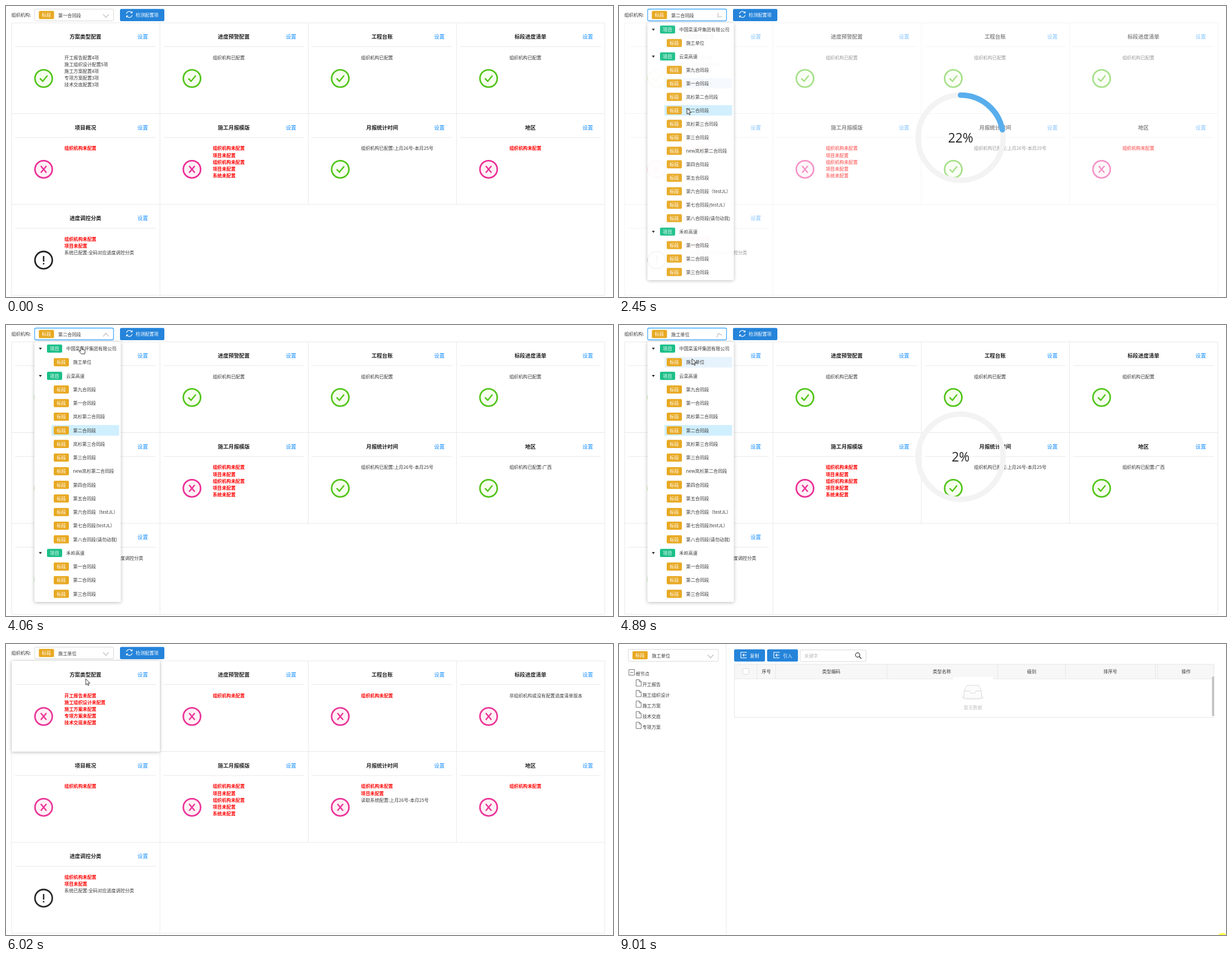
An HTML page for the animation above (9090 ms loop, 1081x518 px).

```html
<!DOCTYPE html>
<html lang="zh-CN">
<head>
<meta charset="utf-8">
<title>配置检测</title>
<style>
html, body { margin: 0; width: 100%; height: 100%; overflow: hidden; background: #fff; }
svg { display: block; width: 100%; height: 100%; }
text { font-family: "Noto Sans CJK SC", "Noto Sans CJK", "Noto Sans", sans-serif; white-space: pre; }
.shadow { filter: drop-shadow(0 1px 3px rgba(0, 0, 0, .28)); }
</style>
</head>
<body>
<svg id="stage" viewBox="0 0 1081 518"></svg>
<script>
const LOOP = 9090;
const FS = 8.14, BIG = 9.45;
const BLUE = '#2584da', LINK = '#1890ff', ORANGE = '#e8a922', GREEN = '#1bbf88', INK = '#383838';
const stage = document.getElementById('stage');

// Markup helpers; text is placed by its vertical middle
const text = (x, y, s, fill = INK, size = FS, extra = '') =>
  `<text x="${x}" y="${y + size * .37}" font-size="${size}" fill="${fill}" ${extra}>${s}</text>`;
const rect = (x, y, w, h, fill, extra = '') =>
  `<rect x="${x}" y="${y}" width="${w}" height="${h}" fill="${fill}" ${extra}/>`;
const path = (d, stroke, width = 1, extra = '') =>
  `<path d="${d}" fill="none" stroke="${stroke}" stroke-width="${width}" ${extra}/>`;
const group = (id, body, extra = '') => `<g id="${id}" ${extra}>${body}</g>`;
const tag = (x, y, s = '标段', fill = ORANGE) =>
  rect(x, y - 7.3, 27, 14.6, fill, 'rx="2"') + text(x + 5.3, y, s, '#fff');
const MID = 'text-anchor="middle"', BOLD = 'font-weight="700"';

// ---- cards ----
const X0 = 10, Y0 = 30, CW = 264.15, CH = 161.7;
const titles = ['方案类型配置', '进度预警配置', '工程台账', '标段进度清单', '项目概况',
  '施工月报模版', '月报统计时间', '地区', '进度调控分类'];
const NO = '!组织机构未配置', YES = '组织机构已配置', NOP = '!项目未配置';
const DATES = ':上月26号-本月25号', KIND = ':全码对应进度调控分类';
const plans = ['开工报告', '施工组织设计', '施工方案', '专项方案', '技术交底'];
const counts = s => plans.map((p, i) => `${p}配置${s[i]}项`);
const monthly = [NO, NOP, NO, NOP, '!系统未配置'];
const fallback = [NO, NOP, '系统已配置' + KIND];

// Icon codes per card: v = ok, x = failed, w = warning
const states = [
  { icons: 'vvvvxxvxw', lines: [counts('45433'), [YES], [YES], [YES], [NO], monthly, [YES + DATES], [NO], fallback] },
  { icons: 'vvvvvxvvv', lines: [counts('44434'), [YES], [YES], [YES], [YES], monthly, [YES + DATES],
    [YES + ':广西'], [YES + KIND, '（禾杉）']] },
  { icons: 'xxxxxxxxw', lines: [plans.map(p => `!${p}未配置`), [NO], [NO], ['非组织机构或没有配置进度清单版本'], [NO],
    monthly, [NO, NOP, '读取系统配置' + DATES], [NO], fallback] }
];
const marks = {
  v: ['#52c41a', '#f6ffed', 'M-6.5 0L-1.5 5L6.8 -5.2'],
  x: ['#eb2f96', '#fff0f6', 'M-5 -6L5 6M5 -6L-5 6'],
  w: ['#222', '#fff', 'M0 -7.5V2.6M0 5V7.7']
};
function icon(kind, x, y) {
  const [color, fill, d] = marks[kind];
  return `<g transform="translate(${x} ${y})"><circle r="15.4" fill="${fill}" stroke="${color}" stroke-width="2.8"/>` +
    path(d, color, 2.5) + '</g>';
}
function card(state, i) {
  const x = X0 + i % 4 * CW, y = Y0 + Math.floor(i / 4) * CH;
  return path(`M${x + 6} ${y + 42.3}h251`, '#e8e8e8') +
    text(x + 131.5, y + 24.5, titles[i], '#222', BIG, MID + ' ' + BOLD) +
    text(x + 224, y + 24.5, '设置', LINK, BIG, `id="link${i}"`) +
    icon(state.icons[i], x + 57, y + 99) +
    state.lines[i].map((s, k) => {
      const bad = s[0] === '!';
      return text(x + 94, y + 61.7 + k * 12.15, bad ? s.slice(1) : s, bad ? '#f00' : INK, FS, bad ? BOLD : '');
    }).join('');
}
function grid() {
  let d = `M10 30H1066.5V515H10ZM10 191.5H1066.5M10 353.2H1066.5M${X0 + CW} 30V515`;
  for (const k of [2, 3]) d += `M${X0 + k * CW} 30V353.2`;
  return path(d, '#e8e8e8');
}

// ---- selector and its tree ----
const rows = ['*中国栾溪坪集团有限公司', '施工单位', '*云栾高速', '第九合同段', '第一合同段', '岚杉第二合同段',
  '第二合同段', '岚杉第三合同段', '第三合同段', 'new岚杉第二合同段', '第四合同段', '第五合同段', '第六合同段（testJL）',
  '第七合同段(testJL）', '第八合同段(请勿动我)', '*禾岭高速', '第一合同段', '第二合同段', '第三合同段'];
const rowY = i => 42 + i * 24.25;
function row(s, i) {
  const y = rowY(i);
  if (s[0] === '*') return `<path d="M58.5 ${y - 1.5}h5.4l-2.7 3.6z" fill="#222"/>` +
    tag(73, y, '项目', GREEN) + text(107.3, y, s.slice(1));
  return rect(81, y - 9.4, 120.5, 18.8, '#fff', `id="row${i}" rx="1.5"`) + tag(85, y) + text(119.5, y, s);
}
const chevron = (id, x, y) => `<g transform="translate(${x} ${y})">` + path('M-5 -2.8L0 2.8L5 -2.8', '#b5b5b5', 1.1, `id="${id}"`) + '</g>';

const config =
  text(9.5, 16, '组织机构:') +
  rect(51, 5.5, 140.5, 21, '#fff', 'id="box" rx="2.5" stroke="#d9d9d9"') +
  tag(58.5, 16) + text(93, 16.5, '', INK, FS, 'id="value"') + chevron('chev', 178, 17.5) +
  rect(203, 5.3, 79, 21.8, BLUE, 'rx="2.5"') +
  path('M214.6 14a5.2 5.2 0 0 1 9.6 -1.8M224.6 16a5.2 5.2 0 0 1 -9.6 1.8M224.6 9.6v2.9h-2.9M214.6 20.4v-2.9h2.9', '#fff', 1.2) +
  text(231, 16.3, '检测配置项', '#fff', FS, 'font-weight="500"') +
  group('panel', grid() + rect(10, 30, CW, CH, '#fff', 'id="lift" class="shadow"') + group('cards', '')) +
  group('loader', '<circle cx="608.3" cy="234.5" r="75.8" fill="none" stroke="#f3f3f3" stroke-width="9.8"/>' +
    path('M608.3 158.7a75.8 75.8 0 1 1 -.01 0', '#58aeed', 9.8, 'id="arc" pathLength="100" stroke-linecap="round"') +
    `<text id="pct" x="608.3" y="243" font-size="22.8" fill="#262626" ${MID} style="font-family:'Open Sans',sans-serif"></text>`) +
  group('drop', rect(50.5, 30, 154, 463, '#fff', 'rx="2.5" class="shadow"') + rows.map(row).join(''));

// ---- plan page ----
function tool(x, label) {
  return rect(x, 9.5, 55, 21.7, BLUE, 'rx="2.5"') +
    path(`M${x + 21.5} 16V14.8H${x + 12}V24.8H${x + 21.5}V23.5M${x + 22} 19.8H${x + 15.5}M${x + 18} 17.3l-2.5 2.5l2.5 2.5`, '#fff', 1.1) +
    text(x + 28.3, 20.5, label, '#fff', FS, 'font-weight="500"');
}
const leaf = (s, i) => {
  const y = 72 + i * 18.9;
  return path(`M30.5 ${y - 8.5}h5.5l3.5 3.5v8h-9zM36 ${y - 8.5}v3.5h3.5`, '#666', .9) + text(41.7, y, s);
};
const heads = [['序号', 262.5], ['类型编码', 378], ['类型名称', 575], ['级别', 735], ['排序号', 875], ['操作', 1010]];
const table =
  rect(205, 36, 855, 26, '#f7f7f7') +
  path('M205.5 36V130.5H1059.5V36ZM205 62H1060' + [246, 279, 477, 674.5, 795, 955, 959].map(x => `M${x} 36V62`).join(''), '#e6e6e6') +
  rect(220.5, 43.5, 10.5, 10.5, '#fff', 'rx="1.5" stroke="#d9d9d9"') +
  heads.map(([s, x]) => text(x, 49, s, INK, FS, MID)).join('') +
  rect(595, 59, 71, 5, '#fff') + rect(1056, 58, 4, 70, '#c4c4c4') +
  '<ellipse cx="630" cy="95" rx="20.5" ry="4.5" fill="#f3f3f3"/>' +
  '<path d="M614.5 83.5L620 73.5H640.5L645.5 83.5V97H614.5ZM614.5 83.5H624L626 87.5H634L636 83.5H645.5" fill="#fcfcfc" stroke="#d9d9d9"/>' +
  text(630.3, 113, '暂无数据', '#bfbfbf', FS, MID);
const page = rect(0, 0, 1081, 518, '#fff') + path('M191 0V518', '#e8e8e8') +
  rect(16.5, 9.5, 160.5, 21.3, '#fff', 'rx="2.5" stroke="#d9d9d9"') + tag(24, 20) + text(58.5, 20.5, '施工单位') + chevron('c2', 163, 22) +
  path('M17.7 45.5h10v10h-10zM19.8 50.5h5.8', '#666', .9) + text(29.7, 53, '根节点') +
  ['开工报告', '施工组织设计', '施工方案', '技术交底', '专项方案'].map(leaf).join('') +
  tool(205, '复制') + tool(263.7, '引入') +
  rect(322.5, 10.5, 117.5, 20.7, '#fff', 'rx="2.5" stroke="#d9d9d9"') + text(330, 20.5, '关键字', '#b8b8b8') +
  '<circle cx="425" cy="19.5" r="3.8" fill="none" stroke="#333" stroke-width="1.2"/>' + path('M427.8 22.3L431.5 26', '#333', 1.4) +
  table;

const arrow = '<path id="arrow" d="M0 0V10.6L2.5 8.4L4.1 12L5.8 11.2L4.2 7.7H7.5Z" fill="#fff" stroke="#222" stroke-width=".9"/>';
const hand = '<path id="hand" d="M-1 1Q0 -.6 1.2 1V5.4L5.6 6.2Q7.2 6.6 7 8.4L6.2 13.2H.2L-3.8 8.6Q-4.2 7 -2.6 7.4L-1 8.6Z" fill="#fff" stroke="#222" stroke-width=".9" stroke-linejoin="round"/>';

stage.innerHTML = group('config', config) + group('page', page) +
  group('cursor', arrow + hand) + '<circle id="spot" cx="1074.5" cy="523" r="9" fill="#ffff55"/>';

// ---- timing ----
const el = {};
stage.querySelectorAll('[id]').forEach(n => { if (!/^link/.test(n.id)) el[n.id] = n; });
const set = (id, attrs) => { for (const k in attrs) el[id].setAttribute(k, attrs[k]); };
const show = (id, on) => set(id, { visibility: on ? 'inherit' : 'hidden' });
const clamp = v => Math.max(0, Math.min(1, v));
const ease = v => 1 - (1 - v) ** 2;
const smooth = v => v * v * (3 - 2 * v);
const ramp = (t, start, len) => clamp((t - start) / len);

const loads = [[2295, 3060], [4885, 5780]];
const opens = [[980, 2375], [3800, 4930]];
const hovers = [[3, 1200, 1400], [5, 1540, 1680], [6, 1680, 2290], [4, 2260, 2330], [1, 4300, 5100]];
// time, x, y, hand
const track = [[80, 804, 313, 0], [780, 128, 14, 1], [1010, 128, 14, 1], [1480, 114, 148, 1], [1850, 121, 182, 1],
  [2300, 121, 182, 0], [2560, 121, 182, 0], [3100, 136, 27, 1], [3810, 136, 27, 1], [4450, 130, 60, 1],
  [4800, 130, 60, 0], [5780, 130, 60, 0], [6020, 142, 62, 0], [6620, 240, 51, 1], [6840, 240, 51, 1], [7100, 246, 54, 1]];

function moveCursor(t) {
  let i = 0;
  while (i < track.length - 1 && track[i + 1][0] <= t) i++;
  const a = track[i], b = track[i + 1] || a;
  const p = smooth(clamp((t - a[0]) / (b[0] - a[0] || 1)));
  const x = a[1] + (b[1] - a[1]) * p, y = a[2] + (b[2] - a[2]) * p;
  set('cursor', { transform: `translate(${x} ${y})` });
  show('cursor', t >= 80 && t < 7450);
  show('hand', a[3]);
  show('arrow', !a[3]);
  return [x, y];
}

function dropdown(t, selected) {
  let seen = 0, scale = 1, turn = 0, active = false;
  for (const [a, b] of opens) {
    if (t < a || t > b + 300) continue;
    const grow = ease(ramp(t, a, 200)), shut = ramp(t, b, 200) ** 3;
    seen = t < b ? grow : 1 - shut;
    scale = .8 + .2 * seen;
    turn = 180 * (ease(ramp(t, a, 260)) - ease(ramp(t, b - 55, 260)));
    active = t < b + 200;
  }
  set('drop', { opacity: seen, transform: `translate(0 ${30 * (1 - scale)}) scale(1 ${scale})` });
  show('drop', seen > 0);
  set('chev', { transform: `rotate(${turn})` });
  set('box', { stroke: t > 780 && t < 5250 ? '#40a9ff' : '#d9d9d9', 'stroke-width': active ? 1.3 : 1 });
  rows.forEach((s, i) => {
    if (s[0] === '*') return;
    let glow = 0;
    for (const [r, a, b] of hovers) if (r === i && t >= a) glow = Math.max(glow, ramp(t, a, 150) * (1 - ramp(t, b, 200)));
    set('row' + i, i === selected ? { fill: '#d0effe', 'fill-opacity': 1 } : { fill: '#e7f3fc', 'fill-opacity': glow });
  });
}

function loading(t) {
  let fade = 1, on = false, pct = 0;
  for (const [a, b] of loads) {
    if (t < a) continue;
    on = t < b;
    pct = Math.min(72, 2 + 10 * Math.floor((t - a + 6) / 80));
    fade = on ? 1 - .7 * ease(ramp(t, a + 20, 300)) : .3 + .7 * ease(ramp(t, b, 300));
  }
  set('panel', { opacity: fade });
  show('loader', on);
  show('arc', on && pct > 2);
  set('arc', { 'stroke-dasharray': `${pct} 200` });
  el.pct.textContent = pct + '%';
}

let drawn = -1;
function render(t) {
  const n = t < loads[0][1] ? 0 : t < loads[1][1] ? 1 : 2;
  if (n !== drawn) {
    el.cards.innerHTML = titles.map((_, i) => card(states[n], i)).join('');
    drawn = n;
  }
  const picked = t < 2290 ? 4 : t < 4860 ? 6 : 1;
  el.value.textContent = rows[picked];
  dropdown(t, t < 2290 ? 4 : 6);
  loading(t);
  const [x, y] = moveCursor(t);
  set('lift', { opacity: Math.max(ramp(t, 5800, 200), x < 274 && y > 30 && t < 780 ? .8 : 0) });
  el.cards.querySelector('#link0').setAttribute('fill', t > 6600 ? '#40a9ff' : LINK);
  show('page', t >= 7450);
  set('page', { opacity: .4 + .6 * ramp(t, 7450, 200) });
  show('config', t < 7650);
  show('spot', t >= 9010);
}

function tick() {
  render(performance.now() % LOOP);
  requestAnimationFrame(tick);
}
tick();
</script>
</body>
</html>
```
